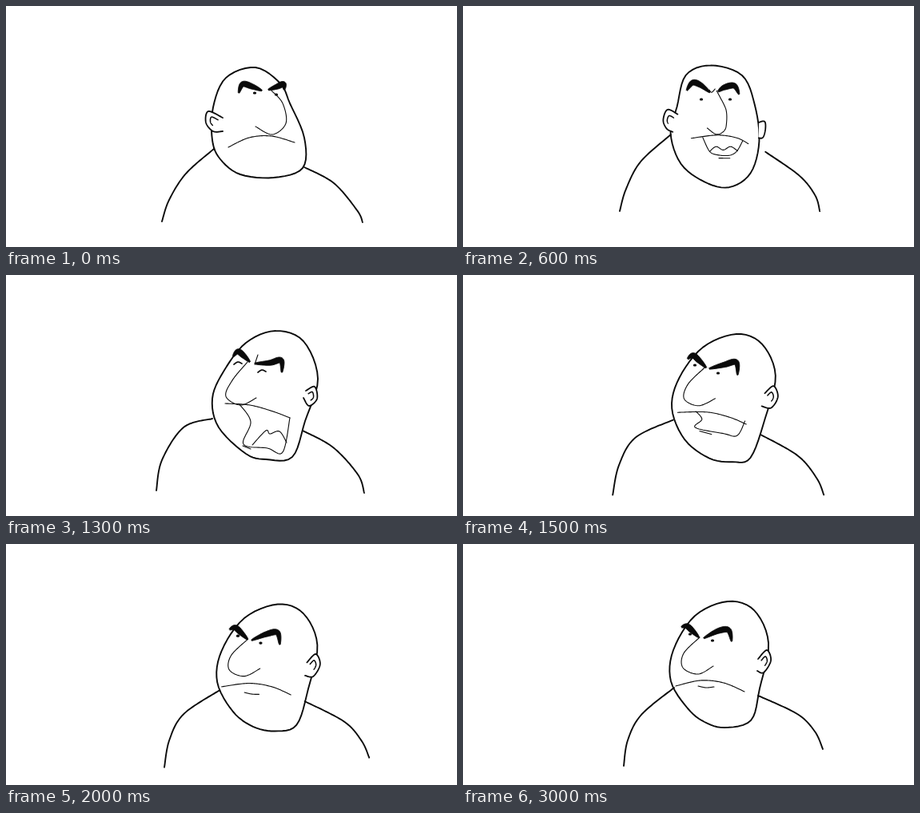
Animation of 564 by 302 pixels, one loop 3400 ms. Source, as an HTML page with a canvas:

```html
<!DOCTYPE html>
<html>
<head>
<meta charset="utf-8">
<style>
html, body { margin: 0; width: 100%; height: 100%; overflow: hidden; background: #fff }
canvas { display: block }
</style>
</head>
<body>
<canvas id="stage" width="564" height="302"></canvas>
<script>
const ctx = document.getElementById('stage').getContext('2d');
const LOOP = 3400, SAMPLES = 66;

// Each part of a pose is a few x y points joined by a smooth curve.
const frown = {
  head: '312 77 275 90 259 127 258 168 268 192 293 211 335 215 371 203 373 165 355 122 343 97',
  armL: '260 179 225 210 204 243 195 270',
  armR: '373 202 410 222 439 256 446 271',
  earL: '271 140 253 132 250 146 259 157 271 157',
  browL: '291 109 296 98 308 101 320 106',
  browR: '328 105 339 101 347 98 348 105',
  dots: '311 109 338 111',
  nose: '332 106 346 122 350 147 333 161 312 151',
  mouth: '278 177 304 165 332 163 361 171'
};
const grin = {
  head: '305 78 275 90 268 130 260 162 274 201 304 223 336 230 361 210 371 170 362 126 346 90',
  armL: '260 169 220 209 205 242 197 267',
  armR: '371 194 415 224 433 248 438 268',
  earL: '270 139 255 131 249 146 254 158 263 162',
  earR: '371 149 377 149 375 166 371 168',
  browL: '281 108 288 98 298 100 311 110',
  browR: '321 108 328 103 340 101 346 111',
  bridge: '308 109 311 111 316 104',
  dots: '298 117 334 117',
  nose: '321 107 340 131 338 152 318 164 301 157',
  mouth: '287 168 320 164 345 167 359 174',
  jaw: '301 167 308 181 322 185 340 183 350 170',
  tongue: '309 181 317 176 326 180 335 176 344 181',
  lip: '323 188 338 188'
};
const laugh = {
  head: '330 60 294 73 266 111 258 150 266 184 294 210 320 216 354 207 368 168 376 115 361 75',
  armL: '259 170 231 179 199 220 192 257',
  armR: '367 178 403 207 430 235 439 254',
  earL: '262 122 256 130 259 141',
  earR: '366 133 379 131 384 145 376 156 365 155',
  browL: '275 97 283 89 291 94 300 101',
  browR: '311 104 322 98 336 96 342 109',
  bridge: '308 90 312 104',
  lids: '286 105 323 110',
  nose: '302 103 288 125 284 146 303 154 319 146 323 137',
  mouth: '279 157 308 153 331 158 348 167',
  jaw: '295 156 305 176 304 190 333 197 342 185 348 167',
  tongue: '306 188 314 177 323 182 333 177 341 184',
  lip: '308 201 317 202'
};
const roar = {
  head: '337 70 300 85 272 121 258 155 266 191 300 224 325 231 358 228 374 183 390 130 372 83',
  armL: '258 180 222 191 195 232 188 270',
  armR: '371 195 409 216 440 250 448 273',
  earR: '375 145 386 140 389 155 379 164 372 154',
  browL: '284 102 290 96 297 101 305 109',
  browR: '311 111 330 110 344 107 345 122',
  bridge: '315 100 311 112',
  lids: '290 111 320 121',
  nose: '302 109 283 132 275 152 293 163 313 154',
  mouth: '274 161 305 163 334 171 355 179',
  jaw: '292 162 306 184 297 212 327 217 346 222 355 179',
  tongue: '308 213 325 195 330 199 342 196 351 210',
  lip: '296 214 306 218'
};
const snarl = {
  head: '343 75 300 92 270 131 262 170 280 210 310 231 340 235 360 229 379 178 391 125 374 87',
  armL: '264 182 214 207 195 240 187 277',
  armR: '372 201 421 229 443 256 452 276',
  earR: '378 149 389 139 395 152 387 167 374 167',
  browL: '280 106 287 102 295 109 304 118',
  browR: '307 119 326 113 341 110 343 126',
  dots: '290 113 319 123',
  nose: '302 118 281 138 277 156 295 164 316 155',
  mouth: '267 175 305 174 333 180 354 189',
  jaw: '291 173 297 180 289 186 325 194 342 196 352 184',
  lip: '296 191 312 195'
};
const sulk = {
  head: '337 76 296 94 269 137 266 176 287 210 308 227 333 234 366 225 377 185 388 128 370 87',
  armL: '270 184 229 218 212 250 207 282',
  armR: '375 194 424 217 446 239 456 261',
  earR: '375 148 386 137 391 150 382 165 374 163',
  browL: '279 108 286 107 293 113 301 121',
  browR: '307 122 325 113 338 112 342 126',
  dots: '290 117 318 125',
  nose: '302 121 282 141 281 159 300 167 319 157',
  mouth: '272 182 303 175 332 178 358 189',
  lip: '300 182 310 184 320 183'
};

// Catmull-Rom curve, evenly sampled by point index.
function sample(text, closed) {
  const n = text.split(' ').map(Number), count = n.length / 2;
  const spans = closed ? count : count - 1;
  const at = (i, k) => n[k + 2 * (closed ? (i + count) % count : Math.max(0, Math.min(spans, i)))];
  return Array.from({ length: SAMPLES + 1 }, (_, s) => {
    const u = s / SAMPLES * spans, i = Math.min(spans - 1, Math.floor(u)), t = u - i;
    return [0, 1].map(k => {
      const a = at(i - 1, k), b = at(i, k), c = at(i + 1, k), d = at(i + 2, k);
      return b + t / 2 * (c - a + t * (2 * a - 5 * b + 4 * c - d + t * (3 * (b - c) + d - a)));
    });
  });
}

const shift = (points, dx, dy) => points.map(([x, y]) => [x + dx, y + dy]);
const mapParts = (pose, fn) => Object.fromEntries(
  Object.entries(pose).map(([part, value]) => [part, fn(value, part)]));

const poses = [frown, grin, laugh, roar, snarl, sulk].map(pose =>
  mapParts(pose, (text, part) => sample(text, part === 'head')));
poses.push(mapParts(poses[5], points => shift(points, -6, -4)));

// Start time, pose (a fraction lies between two poses), right arm dx, both arms dy.
const cues = [
  [0, 0], [200, .49, 6, 4], [300, 1], [600, 1.2, 8, -8], [900, 2], [1300, 3],
  [1500, 3.8], [1800, 4], [2000, 4.55], [2500, 5], [2700, 5.5], [3000, 6]
];

function line(points, width, fill) {
  ctx.beginPath();
  for (const [x, y] of points) ctx.lineTo(x, y);
  if (fill) {
    ctx.fillStyle = fill;
    ctx.fill();
  }
  ctx.lineWidth = width;
  ctx.stroke();
}

function ear(points) {
  line(points, 1.8, '#fff');
  const xs = points.map(p => p[0]), ys = points.map(p => p[1]);
  const mid = v => (Math.min(...v) + Math.max(...v)) / 2;
  if (Math.max(...xs) - Math.min(...xs) < 10) return;
  const cx = mid(xs), cy = mid(ys);
  const inner = points.slice(0, SAMPLES * .7).map(([x, y]) => [cx + (x - cx) * .45, cy + (y - cy) * .45]);
  line(inner, 1.5);
}

// A tapered band around the centre line.
function brow(points) {
  const side = sign => points.map(([x, y], i) => {
    const [ax, ay] = points[Math.max(0, i - 1)], [bx, by] = points[Math.min(SAMPLES, i + 1)];
    const half = sign * (.7 + 2.9 * Math.sin(Math.PI * i / SAMPLES)) / Math.hypot(bx - ax, by - ay);
    return [x - (by - ay) * half, y + (bx - ax) * half];
  });
  line([...side(1), ...side(-1).reverse()], 1, '#0a0a0a');
}

const ends = points => [points[0], points[SAMPLES]];
const dots = points => ends(points).forEach(([x, y]) => line([[x - .5, y], [x + .5, y]], 3.2));
const lids = points => ends(points).forEach(([x, y]) => line(sample(
  [x - 5, y + 1, x, y - 2, x + 5, y].join(' ')), 1.7));
const bold = points => line(points, 1.9);
const fine = points => line(points, 1.1);

const draw = {
  head: bold, armL: bold, armR: bold, earL: ear, earR: ear, nose: fine, mouth: fine,
  jaw: fine, tongue: fine, lip: fine, bridge: fine, browL: brow, browR: brow, dots, lids
};

function drawPose([, pose, armX = 0, armY = 0]) {
  const mix = pose % 1, near = poses[Math.round(pose)];
  const from = poses[Math.floor(pose)], to = poses[Math.ceil(pose)];
  ctx.clearRect(0, 0, 564, 302);
  for (const part in draw) {
    if (!near[part]) continue;
    const a = from[part] || near[part], b = to[part] || near[part];
    const points = a.map((p, i) => p.map((v, k) => v + (b[i][k] - v) * mix));
    const isArm = part.startsWith('arm');
    draw[part](shift(points, part === 'armR' ? armX : 0, isArm ? armY : 0));
  }
}

ctx.strokeStyle = '#0a0a0a';
ctx.lineCap = ctx.lineJoin = 'round';

const start = performance.now();
function tick() {
  const time = (performance.now() - start) % LOOP;
  drawPose(cues.findLast(cue => cue[0] <= time));
  requestAnimationFrame(tick);
}
tick();
</script>
</body>
</html>
```
